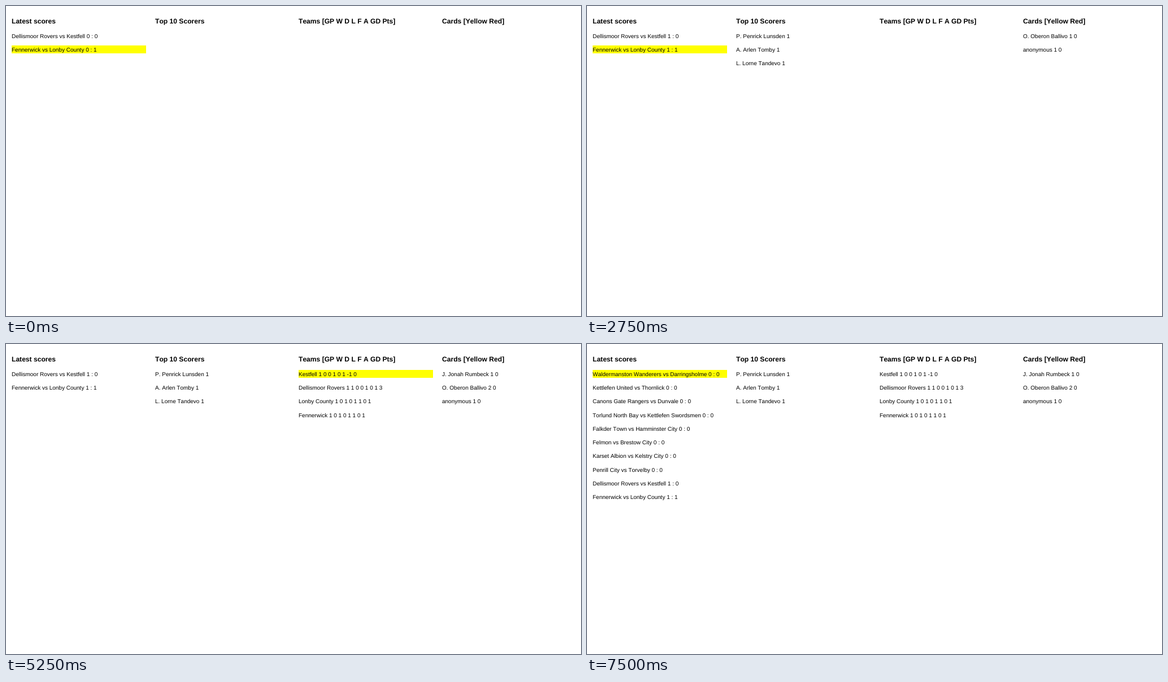
An HTML page for the animation above (8 s loop, 1018 by 550 pixels).

```html
<!DOCTYPE html>
<html lang="en">
<head>
<meta charset="utf-8">
<title>Live scores</title>
<style>
  html, body { margin: 0; width: 100%; height: 100%; overflow: hidden; background: #fff; }
  svg { display: block; width: 1018px; height: 550px; }
  text {
    font: 10px "Liberation Sans", Arial, sans-serif;
    font-kerning: none;
    text-rendering: geometricPrecision;
    fill: #000;
  }
  .title { font-size: 12.1px; font-weight: bold; }
</style>
</head>
<body>
<svg id="board" viewBox="0 0 1018 550"></svg>
<script>
const LOOP = 8000;
const titles = ["Latest scores", "Top 10 Scorers", "Teams [GP W D L F A GD Pts]", "Cards [Yellow Red]"];

// Matches that kick off later are stacked above the first two.
const laterMatches = [
  "Waldermanston Wanderers vs Darringsholme",
  "Kettlefen United vs Thornlick",
  "Canons Gate Rangers vs Dunvale",
  "Torlund North Bay vs Kettlefen Swordsmen",
  "Falkder Town vs Hamminster City",
  "Felmon vs Brestow City",
  "Karset Albion vs Kelstry City",
  "Penrill City vs Torvelby"
].map(match => match + " 0 : 0");
const kickOffs = [[0, 0], [6750, 2], [7000, 4], [7250, 7], [7500, 8]];

const scorers = [[500, "P. Penrick Lunsden 1"], [1750, "A. Arlen Tomby 1"], [2750, "L. Lorne Tandevo 1"]];
const teams = [
  [5250, "Kestfell 1 0 0 1 0 1 -1 0"],
  [5250, "Dellismoor Rovers 1 1 0 0 1 0 1 3"],
  [5000, "Lonby County 1 0 1 0 1 1 0 1"],
  [5000, "Fennerwick 1 0 1 0 1 1 0 1"]
];

// Start time, column and row of the highlighted entry.
const highlights = [
  [0, 0, 1], [750, 3, 0], [1500, 0, 0], [2500, 0, 1], [3750, 3, 1], [5000, 2, 0], [6750, 0, 0]
];

const latest = (events, t) => events.filter(([start]) => start <= t).pop();
const visible = (entries, t) => entries.filter(([start]) => start <= t).map(([, label]) => label);

function columnsAt(t) {
  const started = latest(kickOffs, t)[1];
  const scores = [
    ...laterMatches.slice(laterMatches.length - started),
    `Dellismoor Rovers vs Kestfell ${t < 1500 ? 0 : 1} : 0`,
    `Fennerwick vs Lonby County ${t < 2500 ? 0 : 1} : 1`
  ];
  const cards = [
    [3750, "J. Jonah Rumbeck 1 0"],
    [1000, `O. Oberon Ballivo ${t < 3750 ? 1 : 2} 0`],
    [750, "anonymous 1 0"]
  ];
  return [scores, visible(scorers, t), visible(teams, t), visible(cards, t)];
}

const columnX = column => 10 + 254 * column;
const baseline = row => Math.round(57 + 24.22 * row);
const text = (label, x, y, kind = "row") => `<text class="${kind}" x="${x}" y="${y}">${label}</text>`;

function draw(t) {
  const [, column, row] = latest(highlights, t);
  const band = `<rect x="${columnX(column)}" y="${baseline(row) - 11}" width="238" height="14" fill="#ff0"/>`;
  const headings = titles.map((title, i) => text(title, columnX(i), 31, "title"));
  const rows = columnsAt(t).flatMap((labels, i) =>
    labels.map((label, j) => text(label, columnX(i), baseline(j))));
  return band + headings.join("") + rows.join("");
}

const board = document.getElementById("board");
const origin = performance.now();
let shown = "";

function update() {
  const picture = draw((performance.now() - origin) % LOOP);
  if (picture !== shown) board.innerHTML = shown = picture;
  requestAnimationFrame(update);
}
update();
</script>
</body>
</html>
```
